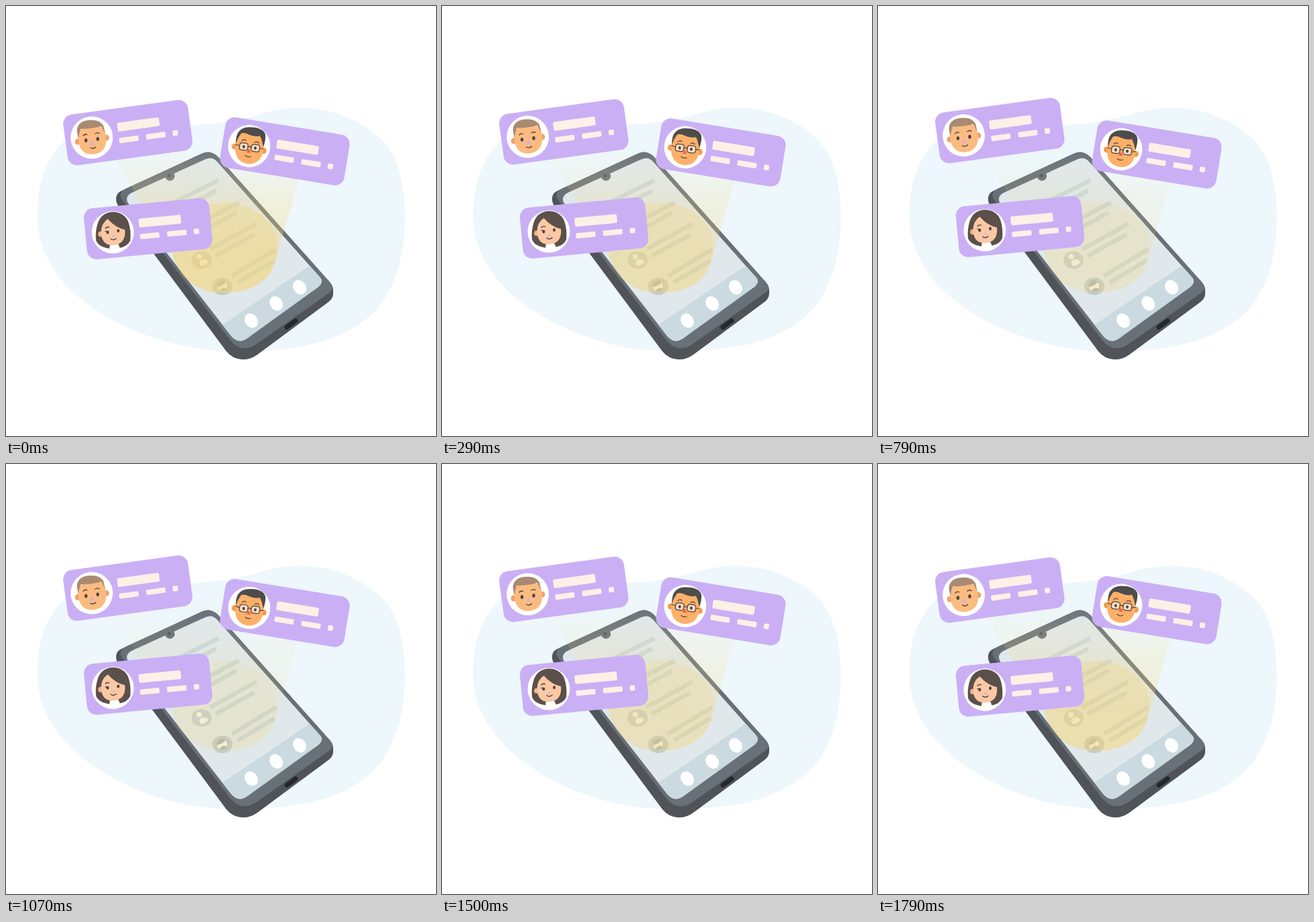
Write an HTML page that moves like this. It is 640 px wide and 640 px high and loops after 1870 ms.

```html
<!DOCTYPE html>
<html lang="en">
<head>
<meta charset="utf-8">
<title>Contact cards</title>
<style>
html, body { margin: 0; width: 100%; height: 100%; overflow: hidden; background: #fff; }
svg { display: block; width: 100vw; height: 100vh; }
.line { fill: none; stroke: #4b4448; stroke-width: 1.4; stroke-linecap: round; stroke-linejoin: round; }
.eye { fill: #4b4448; }
.rows { stroke: #c9d8dc; stroke-width: 6.5; }
.tile { fill: #caaff5; }
.bars { fill: #fdf0e6; }
</style>
</head>
<body>
<svg viewBox="0 0 640 640">
  <defs>
    <linearGradient id="glow" gradientUnits="userSpaceOnUse" x1="0" y1="206" x2="0" y2="376">
      <stop offset="0" stop-color="#f8efd0" stop-opacity="0"/>
      <stop offset=".2" stop-color="#f6e6b0" stop-opacity=".14"/>
      <stop offset=".5" stop-color="#f6db85" stop-opacity=".27"/>
      <stop offset="1" stop-color="#f6d674" stop-opacity=".35"/>
    </linearGradient>
    <g id="panel">
      <rect class="tile" x="-93.7" y="-38.1" width="187.4" height="76.2" rx="14"/>
    </g>
    <g id="details">
      <circle cx="-54.2" r="31.4" fill="#fff"/>
      <g class="bars">
        <rect x="-14.3" y="-16.6" width="63" height="13.2" rx="2.2"/>
        <rect x="-14.3" y="6.2" width="29" height="8" rx="1.6"/>
        <rect x="26.2" y="6.2" width="29" height="8" rx="1.6"/>
        <rect x="66" y="6.2" width="8" height="8" rx="2"/>
      </g>
    </g>
  </defs>

  <path fill="#edf7fc" d="M46.500 312C46.500 268 58 228 86 202C120 172 190 173 240 176C300 180 340 171 372 163C410 150 445 148 482 157C520 167 560 190 577 224C590 252 593.500 285 593.500 318C593.500 365 582 410 560 441C530 482 480 500 430 508C390 514 340 516 295 511C240 505 175 482 125 446C76 411 46.500 365 46.500 312Z"/>

  <g id="phone">
    <path fill="#505358" d="M172 275L292 219.500Q305 213.500 316 225L481 410Q487 416 487 424V428Q487 436 478 442L374 519Q363 527 351 526Q337 525 328 514L168 299Q163 292 164 285Q165 278 172 275Z"/>
    <path fill="#687078" d="M178 272L292 219.500Q305 213.500 316 225L481 410Q492 421 478 429L374 502.500Q352 518 335 499L174 290Q165 279 178 272Z"/>
    <path fill="#e0e8eb" d="M187 278L297 228Q307 223.500 314 231.500L468 404.500Q473 411 465 418L359 494.500Q346 504 335 491L182 294Q176 284 187 278Z"/>
    <path fill="#cadae0" d="M322 474.500L452 386.500L468 404.500Q473 411 465 418L359 494.500Q346 504 335 491Z"/>
    <circle cx="244" cy="253" r="7.200" fill="#687078"/>
    <circle cx="243" cy="252.500" r="2.500" fill="#505358"/>
    <g fill="#fff">
      <ellipse rx="9.300" ry="11.300" transform="translate(365 468.300) rotate(-33)"/>
      <ellipse rx="9.300" ry="11.300" transform="translate(402.200 442.800) rotate(-33)"/>
      <ellipse rx="9.300" ry="11.300" transform="translate(437 418.700) rotate(-33)"/>
    </g>
    <path stroke="#25282d" stroke-width="7" stroke-linecap="round" d="M418 478L431 468.500"/>
    <g class="rows">
      <path d="M246 294L316 259.500M256 304L313 275M275 330L347 292.500M284 340L343 307.500M304 362L373 324M312 372L370 340M336 402L402 362M345 411.500L400 378.500"/>
    </g>
    <ellipse cx="291" cy="378" rx="15" ry="13" fill="#c3d0d2"/>
    <circle cx="287.500" cy="373" r="4" fill="#f3f3ee"/>
    <path fill="#f3f3ee" d="M288 383Q288 377 294 377Q300 377 301.500 381Q296 387 290 387Z"/>
    <ellipse cx="322" cy="417.300" rx="15" ry="13" fill="#bdcbce"/>
    <circle cx="322" cy="417" r="8.500" fill="#a9b5b6"/>
    <path fill="#f3f3ee" d="M314 418Q321 418 327 411Q331 416 328 421Q323 417 318 424Q314 422 314 418Z"/>
  </g>

  <g id="beam">
    <path fill="url(#glow)" d="M147 205L247 366C258 410 290 427 325 427C365 427 395 408 401 378L452 205Z"/>
    <path fill="#f6d06a" fill-opacity=".32" d="M247 362C252 322 284 293 325 293C370 293 404 324 404 358Q404 368 401 378C395 408 365 427 325 427C290 427 258 410 247 366Z"/>
  </g>

  <g id="cardA">
    <g transform="translate(181.300 188.500) rotate(-7.800)"><use href="#panel"/><use href="#details"/></g>
    <circle cx="107" cy="202" r="4.500" fill="#f0a169"/>
    <circle cx="149" cy="196" r="4.500" fill="#f0a169"/>
    <path fill="#fbbb80" d="M107 186Q125 175 146 181L149 197Q150 217 132 220.500Q112 223 108 203Z"/>
    <path fill="#a98a72" d="M107.500 197L105.500 186Q106 172 122 170Q139 168 145 178L147.500 191Q145 184 142 179Q126 183 111 183Q109 190 107.500 197Z"/>
    <ellipse class="eye" cx="119" cy="200" rx="2.200" ry="2.900"/>
    <ellipse class="eye" cx="136.500" cy="197.800" rx="2.200" ry="2.900"/>
    <path class="line" d="M115 193Q117 190 120.500 191.500M133 190Q136 187.500 139 189.500M125.500 211Q130 213.500 133.500 210"/>
    <path fill="#c8aef2" d="M128.300 200.500L131.500 206.500L125.500 207.200Z"/>
  </g>

  <g id="cardB">
    <g transform="translate(415 216.200) rotate(9.300)"><use href="#panel"/><use href="#details" x=".600" y="1"/></g>
    <circle cx="340.500" cy="209" r="4.500" fill="#f59a4d"/>
    <circle cx="383.300" cy="215.500" r="4.500" fill="#f59a4d"/>
    <path fill="#feb068" d="M344 191Q364 182 384 198L383 215Q379 236 360 235Q341 232 341 211Z"/>
    <path fill="#4d4c4b" d="M342 205Q342 195 345 189Q351 179 366 180.500Q382 181 386 191Q387 199 383 210Q381 199 378 193.500Q369 195 362 191.500Q355 188 350 189.500Q345 196 342 205Z"/>
    <g class="line" style="fill:#fddcbd;stroke-width:1.2">
      <rect x="-6.200" y="-5.300" width="12.400" height="10.600" rx="3.500" transform="translate(353.800 209.300) rotate(8)"/>
      <rect x="-6.200" y="-5.300" width="12.400" height="10.600" rx="3.500" transform="translate(371.300 211.500) rotate(8)"/>
    </g>
    <path class="line" style="stroke-width:1.2" d="M360 209.500Q363 208.500 365 210.300M347.500 208L342 206M377.500 212.500L383 212M351 200.500Q354 197.500 357 200M370 203Q374 201 376.500 204M356 222.500Q360 226 364.500 224"/>
    <ellipse class="eye" cx="353.800" cy="209.500" rx="1.900" ry="2.400"/>
    <ellipse class="eye" cx="371" cy="211.500" rx="1.900" ry="2.400"/>
    <path fill="#f05a40" d="M361.600 212.500L364.300 218.500L358 217.800Z"/>
  </g>

  <g id="cardC">
    <g transform="translate(211.500 331.500) rotate(-5.400)"><use href="#panel"/><use href="#details" x="1.300" y=".400"/></g>
    <path fill="#5c504b" d="M134 349Q132.500 335 137 322Q143 307 159 306.500Q176 307 182 321Q186.500 334 185 349Q181 358 169 360L167 354H155V361Q138 359 134 349Z"/>
    <path fill="#fff" d="M154 357Q162 355 168 356L170 362L165 368H155Z"/>
    <circle cx="141" cy="339.500" r="4" fill="#f4b18c"/>
    <path fill="#fcc8a4" d="M151.500 317Q163 330 177 333Q179 354 160 356Q142 357 141.500 336Q142 323 151.500 317Z"/>
    <ellipse class="eye" cx="151.300" cy="336.800" rx="2" ry="2.600"/>
    <ellipse class="eye" cx="167" cy="334.500" rx="2" ry="2.600"/>
    <path class="line" d="M148 331Q150 328 153.500 329.500M148 335.500L150 335.500M156 346.500Q160 349.500 164 346"/>
    <path fill="#cdb2ee" d="M159.800 339.500L162 343.500L157.800 344Z"/>
  </g>
</svg>
<script>
const LOOP = 1870, STEP = 1000 / 14, HALF = 14, LAST = 25;
const get = id => document.getElementById(id);
const beam = get("beam");
const drift = [[get("cardA"), -4], [get("cardB"), 6], [get("cardC"), -4]];

function draw(now) {
  const step = Math.min(LAST, Math.floor((now % LOOP + 5) / STEP));
  const p = 1 - Math.abs(1 - step / HALF);
  for (const [card, dy] of drift) card.setAttribute("transform", `translate(0 ${dy * p})`);
  beam.setAttribute("opacity", 1 - 0.67 * p);
}

let start;
function tick(now) {
  start ??= now;
  draw(now - start);
  requestAnimationFrame(tick);
}
draw(0);
requestAnimationFrame(tick);
</script>
</body>
</html>
```
